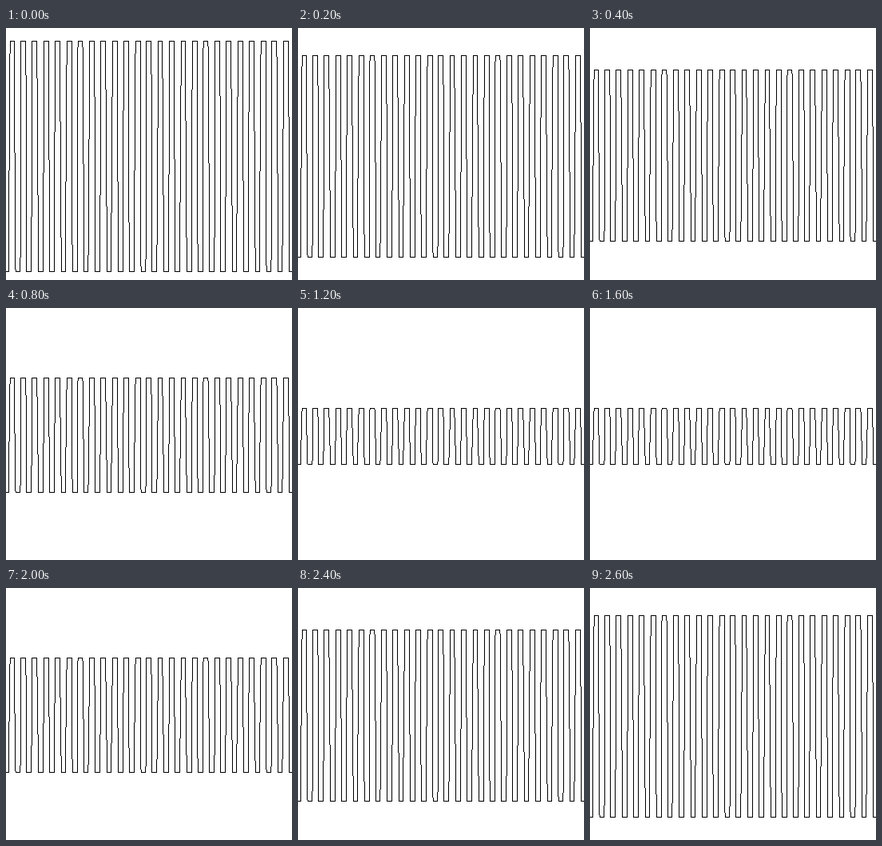
Write an HTML page with a canvas that moves like this. It is 358 px wide and 315 px high and loops after 2.8 s.

```html
<!DOCTYPE html>
<html lang="en">
<head>
<meta charset="utf-8">
<title>Square wave</title>
<style>
  html, body { margin: 0; width: 100%; height: 100%; overflow: hidden; background: #fff; }
  canvas { display: block; image-rendering: pixelated; }
</style>
</head>
<body>
<canvas id="wave" width="358" height="315"></canvas>
<script>
const W = 358, H = 315, STEP = 200, EDGES = 50;
const ctx = document.getElementById('wave').getContext('2d');

// Top and bottom row of the wave at each amplitude
const levels = [
  [16, 304], [34, 286], [52, 266], [69, 248],
  [87, 230], [105, 212], [125, 195], [143, 177]
];
const CYCLE = 2 * (levels.length - 1);

// The wave is plotted from evenly spaced samples
const sampleX = n => 0.655 + 0.98745 * n;

// Samples just before and after sign change i; even ones rise, odd ones fall
function jump(i) {
  const pos = 2.64 + 217 / 30 * i;
  const left = sampleX(Math.floor(pos)), right = sampleX(Math.floor(pos + 1.4));
  return i % 2 ? { head: left, foot: right } : { head: right, foot: left };
}

function flat(x0, x1, y) {
  const a = Math.round(x0);
  ctx.fillRect(a, y, Math.round(x1) - a + 1, 1);
}

// Steep line without smoothing, one pixel per row
function edge({ head, foot }, top, bottom) {
  for (let y = top; y <= bottom; y++) {
    const x = head + (foot - head) * (y - top) / (bottom - top);
    ctx.fillRect(Math.round(x), y, 1, 1);
  }
}

function draw([top, bottom]) {
  ctx.fillStyle = '#fff';
  ctx.fillRect(0, 0, W, H);
  ctx.fillStyle = '#000';
  let from = 0;
  for (let i = 0; i < EDGES; i += 2) {
    const rise = jump(i), fall = jump(i + 1);
    flat(from, rise.foot, bottom);
    edge(rise, top, bottom);
    flat(rise.head, fall.head, top);
    edge(fall, top, bottom);
    from = fall.foot;
  }
  flat(from, W - 1, bottom);
}

const start = performance.now();
let shown = -1;

function tick(now) {
  const i = Math.floor(Math.max(0, now - start) / STEP) % CYCLE;
  const level = Math.min(i, CYCLE - i);
  if (level !== shown) draw(levels[shown = level]);
  requestAnimationFrame(tick);
}
tick(start);
</script>
</body>
</html>
```
